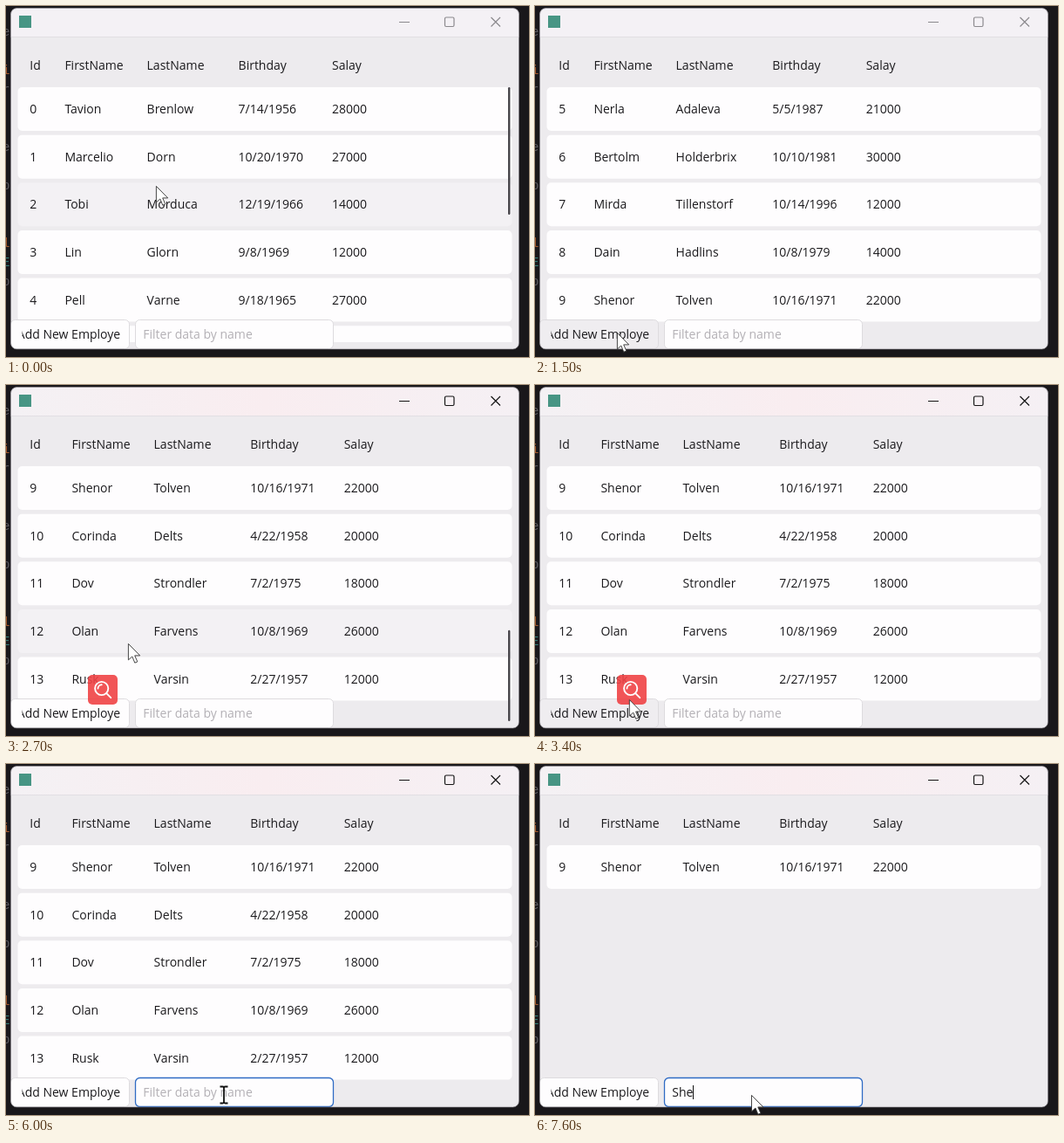
These frames come from a looping animation (600 by 402 pixels, 8 s). An HTML page:

```html
<!DOCTYPE html>
<html lang="en">
<head>
<meta charset="utf-8">
<title>Employee list</title>
<style>
  html, body { margin: 0; width: 100%; height: 100%; overflow: hidden; background: #19171a; }
  svg { display: block; width: 600px; height: 402px; }
  text { font: 14px "Open Sans", "Noto Sans", sans-serif; fill: #1b1a1d; white-space: pre; }
  #code text { font: 14px "Liberation Mono", monospace; fill: #5c5a5f; }
</style>
</head>
<body>
<svg viewBox="0 0 600 402">
  <defs>
    <linearGradient id="tint">
      <stop offset="0" stop-color="#f4f1f4"/>
      <stop offset=".5" stop-color="#f9edf0"/>
      <stop offset="1" stop-color="#f5f0f4"/>
    </linearGradient>
    <clipPath id="frame"><rect x="5.5" y="2.5" width="583" height="390.5" rx="7"/></clipPath>
    <clipPath id="view"><rect x="6" y="90" width="582" height="295"/></clipPath>
    <clipPath id="label"><rect x="18.5" y="362" width="112.5" height="28"/></clipPath>
  </defs>
  <rect width="600" height="402" fill="#19171a"/>
  <g id="code"></g>
  <g clip-path="url(#frame)">
    <rect x="5" y="2" width="584" height="392" fill="#edebee"/>
    <rect id="title" x="5" y="2" width="584" height="33.5"/>
    <rect x="5" y="35" width="584" height="1" fill="#e2dfe3"/>
    <rect x="15" y="11" width="14" height="14" fill="#479584"/>
    <g id="controls" fill="none" stroke-width="1.2">
      <path d="M451 18.5h12M556.5 13l10.5 10.5M567 13l-10.5 10.5"/>
      <rect x="503.5" y="13" width="10.5" height="10.5" rx="1.5"/>
    </g>
    <g id="head"></g>
    <g id="rows" clip-path="url(#view)"></g>
    <rect id="thumb" x="576" width="2.4" rx="1.2" fill="#48464b"/>
    <rect id="button" x="5.5" y="359.5" width="136" height="33" rx="5" stroke="#dddbde"/>
    <g clip-path="url(#label)"><text x="12.8" y="381">Add New Employee</text></g>
    <rect id="box" x="148.5" y="359.5" width="227" height="33" rx="5" fill="#fefdfe"/>
    <text id="input" x="157.3" y="381"></text>
    <rect id="caret" y="368" width="1" height="16" fill="#111"/>
    <g id="search">
      <rect x="94" y="332" width="34" height="34" rx="5" fill="#f04346"/>
      <g fill="none" stroke="#fff" stroke-width="1.9" stroke-linecap="round">
        <circle cx="109.7" cy="347.5" r="7.6"/>
        <path d="M115.3 353.2l5 5M105.5 347.5a4.3 4.3 0 0 1 4.2-4.2"/>
      </g>
    </g>
  </g>
  <rect x="5.5" y="2.5" width="583" height="390.5" rx="7" fill="none" stroke="#77747a" stroke-opacity=".6"/>
  <path id="arrow" d="M0 0V18.5L4.4 14.6 7.4 21.8 10.4 20.5 7.3 13.5H13.3Z" fill="#fff" stroke="#333" stroke-width=".9"/>
  <path id="beam" d="M-4.5 -9.5h3.2q1.3 0 1.3 1.5v16q0 1.5 -1.3 1.5h-3.2M4.5 -9.5h-3.2q-1.3 0 -1.3 1.5M4.5 9.5h-3.2q-1.3 0 -1.3 -1.5" fill="none" stroke="#111" stroke-width="1.8"/>
</svg>
<script>
const LOOP = 8000, STEP = 100, PITCH = 54.65, TOP = 93, TRACK = 292, BLINK = 530;
const ACTIVATE = 1600, FOCUS = 4370, TYPE = 6200, KEY = 235, FILTER = 7600, QUERY = "She";
const INK = "#1b1a1d", CARD = "#fefdfe", EDGE = "#dddbde";

const people = `Tavion Brenlow 7/14/1956 28000
Marcelio Dorn 10/20/1970 27000
Tobi Morduca 12/19/1966 14000
Lin Glorn 9/8/1969 12000
Pell Varne 9/18/1965 27000
Nerla Adaleva 5/5/1987 21000
Bertolm Holderbrix 10/10/1981 30000
Mirda Tillenstorf 10/14/1996 12000
Dain Hadlins 10/8/1979 14000
Shenor Tolven 10/16/1971 22000
Corinda Delts 4/22/1958 20000
Dov Strondler 7/2/1975 18000
Olan Farvens 10/8/1969 26000
Rusk Varsin 2/27/1957 12000`.split("\n").map((line, id) => [id, ...line.split(" ")]);

// Pointer glides, each starting where the last one ended
const glides = [
  { from: 0, to: 400, x: 171, y: 243 },
  { from: 1000, to: 1500, x: 94, y: 374 },
  { from: 2200, to: 2500, x: 140, y: 296 },
  { from: 2900, to: 3600, x: 100, y: 376 },
  { from: 3600, to: 4000, x: 250, y: 379 },
];

const $ = id => document.getElementById(id);
const clamp = (v, lo = 0, hi = 1) => Math.min(hi, Math.max(lo, v));
const ramp = (t, from, to) => clamp((t - from) / (to - from));
const smooth = p => p * p * (3 - 2 * p);
// Whole steps done since a start time, up to a limit
const steps = (t, start, every, max) => clamp(Math.floor((t - start) / every), 0, max);

function pointerAt(t) {
  let x = 172, y = 206;
  for (const g of glides) {
    const p = smooth(ramp(t, g.from, g.to));
    x += (g.x - x) * p;
    y += (g.y - y) * p;
  }
  return [x, y];
}

function caretVisible(t) {
  if (t < FOCUS) return false;
  const lastKey = TYPE + KEY * (QUERY.length - 1);
  const since = t >= FILTER ? FILTER : t >= TYPE ? lastKey : FOCUS;
  return Math.floor(Math.max(0, t - since) / BLINK) % 2 === 0;
}

function set(el, attrs) {
  for (const k in attrs) el.setAttribute(k, attrs[k]);
}
function add(parent, tag, attrs = {}) {
  const el = document.createElementNS("http://www.w3.org/2000/svg", tag);
  set(el, attrs);
  return parent.appendChild(el);
}
function write(el, value) {
  if (el.textContent !== String(value)) el.textContent = value;
}
const cells = (parent, y) => Array.from({ length: 5 }, () => add(parent, "text", { y }));

// Slivers of an editor behind the window
[..."e ir  e p  lEp"].forEach((ch, i) => {
  const el = add($("code"), "text", { x: -4, y: 34 + i * 22 });
  write(el, ch);
  if ("il".includes(ch)) el.style.fill = "#a3592c";
  if (ch === "E") el.style.fill = "#347d77";
});

const head = cells($("head"), 73);
["Id", "FirstName", "LastName", "Birthday", "Salay"].forEach((s, i) => write(head[i], s));
const slots = Array.from({ length: 6 }, (_, i) => {
  const g = add($("rows"), "g"), y = TOP + i * PITCH;
  const card = add(g, "rect", { x: 13.5, y, width: 567, height: 50, rx: 5 });
  return { g, y, card, cells: cells(g, y + 30) };
});

function drawList(t, y, first, total, text) {
  const list = t >= FILTER ? people.filter(p => p[1].startsWith(text)) : people.slice(first, total);
  // Columns only ever grow, as wider cells come into view
  const idGrow = total > 10 ? 8 : 0, nameGrow = first > 0 ? 5.7 : 0;
  const cols = [27.3, 67.4, 161.6, 266.6 + nameGrow, 374 + nameGrow].map((x, i) => i ? x + idGrow : x);
  head.forEach((el, i) => set(el, { x: cols[i] }));
  slots.forEach((slot, n) => {
    const row = list[n];
    slot.g.style.display = row ? "" : "none";
    if (!row) return;
    slot.cells.forEach((el, i) => { set(el, { x: cols[i] }); write(el, row[i]); });
    const hover = y < 359 && y >= slot.y && y < slot.y + 50;
    set(slot.card, { fill: hover ? "#f3f1f4" : CARD });
  });
}

function draw(t) {
  const [x, y] = pointerAt(t);
  const first = steps(t, 80, 120, 5) + steps(t, 2300, 100, 4);
  const total = 10 + steps(t, 1500, 200, 4);
  const text = t < TYPE ? "" : QUERY.slice(0, 1 + steps(t, TYPE, KEY, 2));
  const active = t >= ACTIVATE, focus = t >= 4300;
  const overBox = x > 148 && y > 359, overButton = x < 142 && y > 359;
  drawList(t, y, first, total, text);

  const thumbFade = t < 2300 ? 1 - ramp(t, 1200, 1500) : ramp(t, 2300, 2400) - ramp(t, 3100, 3400);
  set($("thumb"), { y: TOP + TRACK * first / total, height: TRACK * 5 / total, opacity: thumbFade });
  set($("title"), { fill: active ? "url(#tint)" : "#f4f1f5" });
  set($("controls"), { stroke: active ? "#151515" : "#8b898d" });
  set($("button"), { fill: overButton ? "#efedf0" : CARD });
  set($("box"), { stroke: focus ? "#2f6bc4" : overBox ? "#6d6b70" : EDGE, "stroke-width": focus ? 1.3 : 1 });

  write($("input"), text || "Filter data by name");
  $("input").style.fill = text ? INK : "#b3b0b5";
  const end = text ? $("input").getComputedTextLength() : 0;
  set($("caret"), { x: 157 + Math.round(end), opacity: +caretVisible(t) });
  set($("search"), { opacity: .9 * (ramp(t, 1700, 1800) - ramp(t, 3900, 4400)) });

  const beam = overBox && t < TYPE + STEP;
  set($("beam"), { transform: `translate(${x} ${y})`, opacity: +beam });
  set($("arrow"), { transform: `translate(${overBox ? x - 1.5 : x + .4} ${y + .4})`, opacity: +!beam });
}

const start = performance.now();
function tick() {
  const t = (performance.now() - start) % LOOP;
  draw(Math.floor(t / STEP) * STEP);
  requestAnimationFrame(tick);
}
tick();
</script>
</body>
</html>
```
